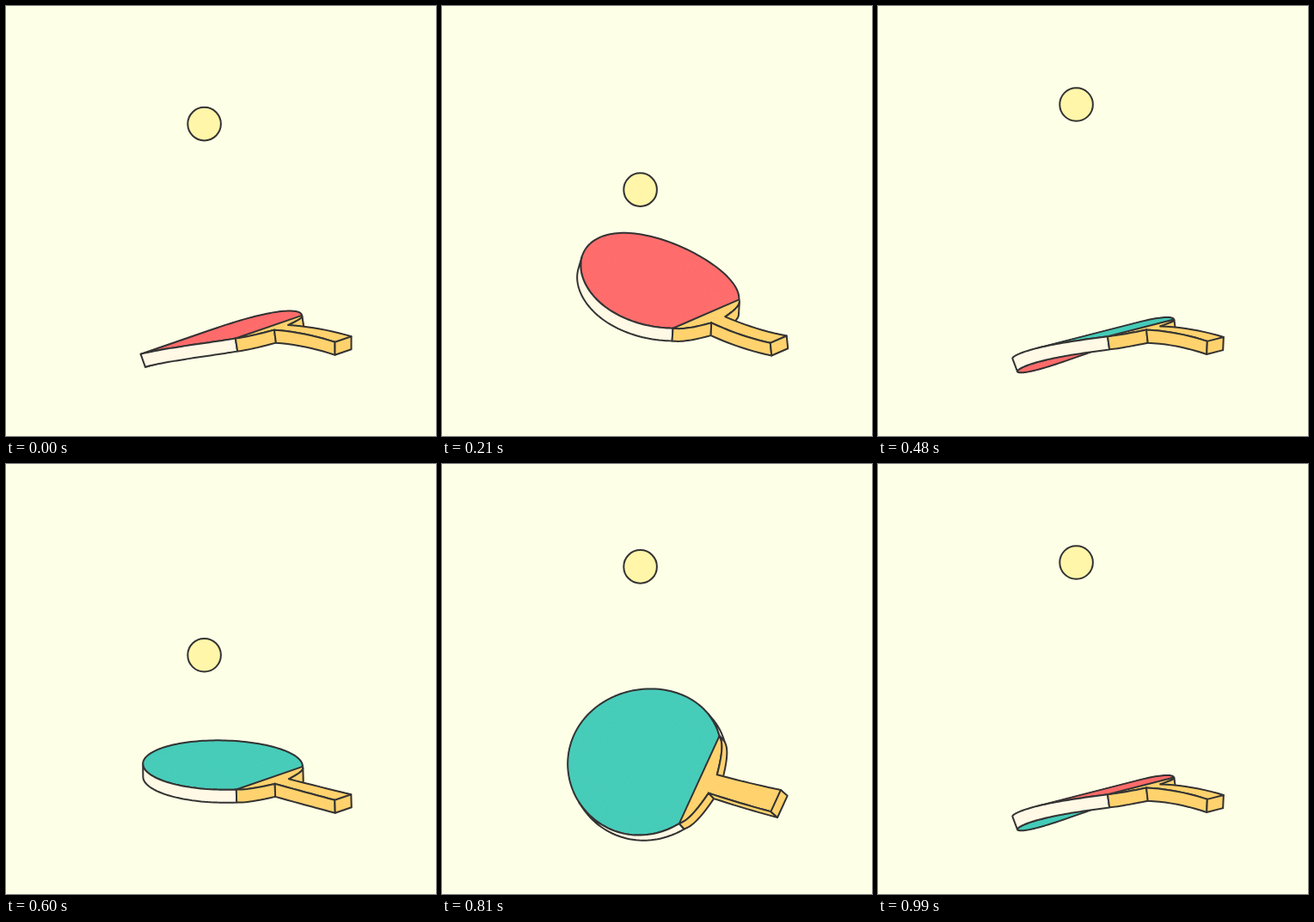
Animation of 500 by 500 pixels, one loop 1.02 s. Source, as an HTML page with a canvas:

```html
<!DOCTYPE html>
<html lang="en">
<head>
<meta charset="utf-8">
<title>Bouncing ball and paddle</title>
<style>
html, body { margin: 0; width: 100%; height: 100%; overflow: hidden; background: #feffe7; }
canvas { display: block; }
</style>
</head>
<body>
<canvas id="stage" width="500" height="500"></canvas>
<script>
const ctx = document.getElementById('stage').getContext('2d');
const INK = '#333', RED = '#ff6b6b', TEAL = '#45ccb9', WOOD = '#ffd26d', RIM = '#fff9e5';
const HALF = 510, STEP = 30;
const RADIUS = 70.5, WIDE = 1.57;
const CUT = RADIUS * Math.sqrt(1 - 1 / WIDE ** 2), NECK = CUT + 14.5, END = CUT + 85.5;

// Outline stations [distance along the axis, half width], from tip to handle end.
function stations(n, fn) {
  return Array.from({ length: n + 1 }, (_, i) => fn(i / n));
}
const cutAngle = Math.PI - Math.asin(1 / WIDE);
const sections = [
  {
    pts: stations(60, q => [-RADIUS * Math.cos(q * cutAngle), WIDE * Math.sin(q * cutAngle)]),
    red: RED, teal: TEAL, rim: RIM, tip: true
  },
  {
    pts: stations(12, q => [CUT + (NECK - CUT) * q, 1 - 0.79 * (0.35 * q + 0.65 * q ** 2.7)]),
    red: WOOD, teal: WOOD, rim: WOOD, cutLine: true
  },
  {
    pts: stations(10, q => [NECK + (END - NECK) * q, 0.21 + 0.037 * q]),
    red: WOOD, teal: WOOD, rim: WOOD, cap: true
  }
];

function fill(color, pts) {
  ctx.beginPath();
  pts.forEach(p => ctx.lineTo(p[0], p[1]));
  ctx.closePath();
  ctx.fillStyle = ctx.strokeStyle = color;
  ctx.lineWidth = 0.8;
  ctx.fill();
  ctx.stroke();
}

function ink(lines) {
  ctx.beginPath();
  for (const [a, b] of lines) {
    ctx.moveTo(a[0], a[1]);
    ctx.lineTo(b[0], b[1]);
  }
  ctx.strokeStyle = INK;
  ctx.lineWidth = 2;
  ctx.stroke();
}

// Signed area of a polygon: its sign tells which way it faces.
function area(pts) {
  return pts.reduce((sum, p, i) => {
    const q = pts[(i + 1) % pts.length];
    return sum + p[0] * q[1] - p[1] * q[0];
  }, 0);
}

// Projection of the paddle, which bends along its axis while it turns over.
function projector(t) {
  const phase = t % HALF;
  const turn = Math.max(0, (phase - 180) / 330);
  const angle = Math.PI * (Math.floor(t / HALF) + (1 - Math.cos(Math.PI * turn)) / 2);
  const c = Math.cos(angle), s = Math.sin(angle);
  const bend = 0.00015 - 0.0019 * Math.cos(2 * Math.PI * (phase - 207) / HALF);
  const slope = 0.256 + 34 * bend;
  const wx = 38.5 * c, wy = -13.3 * c - 54 * s;
  return (u, v, side) => {
    const d = END - u;
    const tx = (2.5 - 8 * (slope - 2 * bend * d)) * c + (9.2 - 0.02 * d) * s;
    const ty = 15 * c - (2.8 + 0.008 * d) * s;
    return [
      392 - d - 0.00095 * s * s * d * d + v * wx + side * tx / 2,
      395 - slope * d + bend * d * d + v * wy + side * ty / 2
    ];
  };
}

// Fills the visible quads of a band, then inks its long edges and chosen ends.
function drawBand(color, quads, shown, startLine, endLine) {
  const lines = [];
  quads.forEach((quad, i) => {
    if (!shown[i]) return;
    const [a, b, c, d] = quad;
    fill(color, quad);
    lines.push([a, b], [c, d]);
    if (i ? !shown[i - 1] : startLine) lines.push([a, d]);
    if (i < quads.length - 1 ? !shown[i + 1] : endLine) lines.push([b, c]);
  });
  ink(lines);
}

function drawSection(sec, at) {
  const spans = sec.pts.slice(1).map((end, i) => [...sec.pts[i], ...end]);
  for (const face of [-1, 1]) {
    const quads = spans.map(([u0, w0, u1, w1]) =>
      [at(u0, -w0, face), at(u1, -w1, face), at(u1, w1, face), at(u0, w0, face)]);
    drawBand(face < 0 ? sec.red : sec.teal, quads, quads.map(q => area(q) * face > 0), sec.cutLine, false);
  }

  const rims = [-1, 1].map(edge => {
    const quads = spans.map(([u0, w0, u1, w1]) =>
      [at(u0, edge * w0, -1), at(u1, edge * w1, -1), at(u1, edge * w1, 1), at(u0, edge * w0, 1)]);
    return { quads, shown: quads.map(q => area(q) * edge < 0) };
  });
  rims.forEach(({ quads, shown }, i) =>
    drawBand(sec.rim, quads, shown, !sec.tip || !rims[1 - i].shown[0], true));

  if (sec.cap) {
    const [u, w] = sec.pts[sec.pts.length - 1];
    const quad = [at(u, -w, -1), at(u, w, -1), at(u, w, 1), at(u, -w, 1)];
    drawBand(sec.rim, [quad], [true], true, true);
  }
}

function drawBall(t) {
  let phase = t % HALF;
  if (phase < 150) phase += HALF;
  const k = (phase - 390) / STEP;
  const y = 73 + (k < 0 ? 8 * (-k) ** 1.6 : 7.9 * k ** 1.51);
  ctx.beginPath();
  ctx.arc(230.6, y, 19.3, 0, 2 * Math.PI);
  ctx.fillStyle = '#fff6a9';
  ctx.strokeStyle = INK;
  ctx.lineWidth = 2;
  ctx.fill();
  ctx.stroke();
}

function frame() {
  const t = Math.floor(performance.now() / STEP) * STEP % (2 * HALF);
  ctx.fillStyle = '#feffe7';
  ctx.fillRect(0, 0, 500, 500);
  ctx.lineCap = ctx.lineJoin = 'round';
  const at = projector(t);
  sections.forEach(sec => drawSection(sec, at));
  drawBall(t);
  requestAnimationFrame(frame);
}
frame();
</script>
</body>
</html>
```
